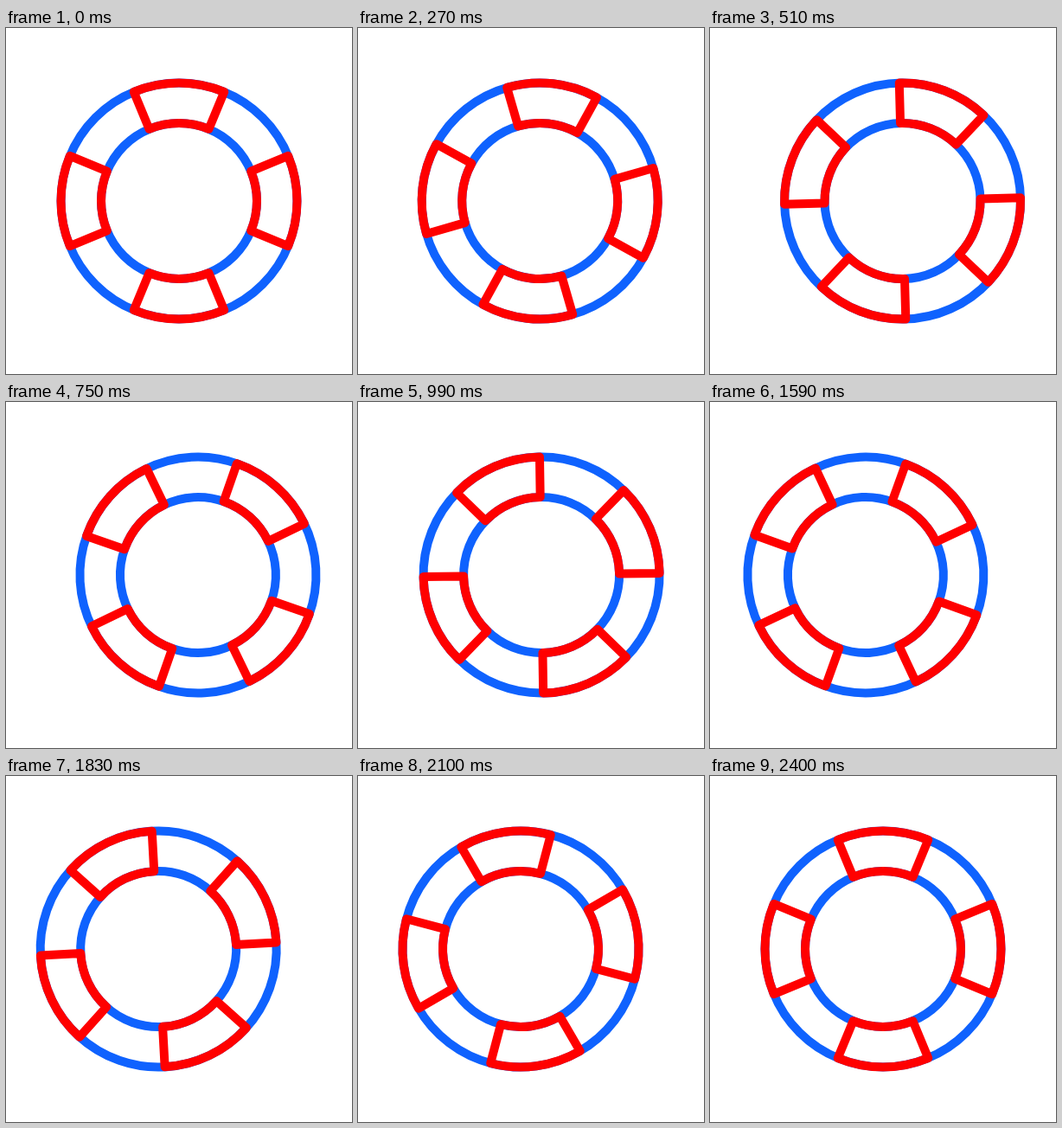
An HTML page with a canvas for the animation above (2460 ms loop, 400 by 400 pixels).

```html
<!DOCTYPE html>
<html lang="en">
<head>
<meta charset="utf-8">
<title>Rolling ring</title>
<style>
  html, body { margin: 0; width: 100%; height: 100%; overflow: hidden; background: #fff; }
  canvas { display: block; width: 400px; height: 400px; }
</style>
</head>
<body>
<canvas id="stage" width="400" height="400"></canvas>
<script>
const ctx = document.getElementById('stage').getContext('2d');
const LOOP = 2460, MOVE = 2400, STEP = 30;
const OUTER = 136.5, INNER = 90, REACH = 24;
const TAU = Math.PI * 2, HALF = TAU / 16;

// Smooth ease from one value to another between two times
function ease(t, start, end, from, to) {
  const p = Math.min(1, Math.max(0, (t - start) / (end - start)));
  return from + (to - from) * p * p * (3 - 2 * p);
}

function shift(t) {
  if (t < 600) return ease(t, 0, 600, 0, REACH);
  if (t < 1800) return ease(t, 600, 1800, REACH, -REACH);
  return ease(t, 1800, MOVE, -REACH, 0);
}

function circle(radius) {
  ctx.beginPath();
  ctx.arc(0, 0, radius, 0, TAU);
  ctx.stroke();
}

function sector(angle) {
  ctx.beginPath();
  ctx.arc(0, 0, OUTER, angle - HALF, angle + HALF);
  ctx.arc(0, 0, INNER, angle + HALF, angle - HALF, true);
  ctx.closePath();
  ctx.stroke();
}

function draw(now) {
  const t = Math.min(MOVE, Math.floor((now % LOOP) / STEP) * STEP);
  ctx.setTransform(1, 0, 0, 1, 0, 0);
  ctx.fillStyle = '#fff';
  ctx.fillRect(0, 0, 400, 400);
  ctx.translate(200 + shift(t), 200);
  ctx.rotate(ease(t, 0, MOVE, 0, Math.PI));
  ctx.lineWidth = 10;
  ctx.lineJoin = 'round';
  ctx.strokeStyle = '#0f62fe';
  circle(OUTER);
  circle(INNER);
  ctx.strokeStyle = '#f00';
  for (let i = 0; i < 4; i++) sector(i * TAU / 4);
}

function tick() {
  draw(performance.now());
  requestAnimationFrame(tick);
}
tick();
</script>
</body>
</html>
```
